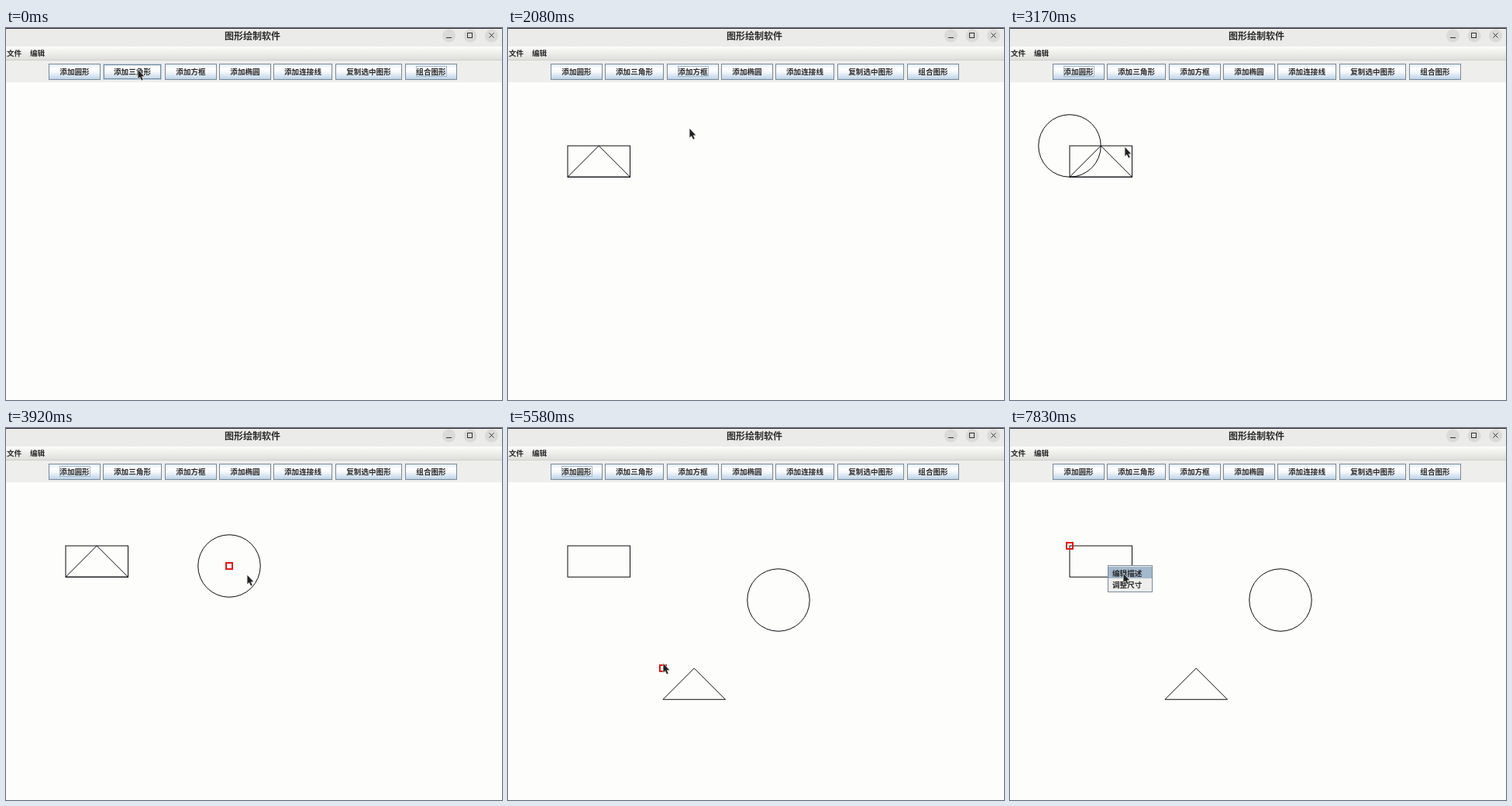
An HTML page with a canvas that plays this animation: 640 by 480 pixels, repeating every 8000 ms.

```html
<!DOCTYPE html>
<html lang="zh-CN">
<head>
<meta charset="utf-8">
<title>图形绘制软件</title>
<style>
  html, body { margin: 0; width: 640px; height: 480px; overflow: hidden; background: #fdfdfb; }
  canvas { display: block; }
</style>
</head>
<body>
<canvas id="stage" width="640" height="480"></canvas>
<script>
const ctx = document.getElementById('stage').getContext('2d');
const LOOP = 8000, STEP = 1000 / 12;
const FONT = '"Noto Sans CJK SC", "Noto Sans CJK", "Noto Sans", sans-serif';
const INK = '#0c0c10', PANEL = '#eeeeec', EDGE = '#7a8a99', PALE = '#b8cfe5';
const CHAR = 9.6, HOME = [77, 152], W = 80.5, H = W / 2;

// Moments at which the user does something, in ms
const AT = {
  triangle: 250, box: 1667, circle: 2917,
  grabCircle: 3333, dropCircle: 4083,
  grabTriangle: 4583, dropTriangle: 5333,
  deselect: 6083, pickBox: 7000, popup: 7333
};

// Pointer moves from where it rests: start, end, x, y
const moves = [
  [AT.triangle, 750, 192, 164],
  [917, 1417, 235, 56],
  [AT.box, 2083, 234, 130],
  [2167, 2500, 300, 56],
  [2500, 2833, 92, 55],
  [AT.circle, 3167, 148, 154],
  [3167, AT.grabCircle, 100, 164],
  [AT.grabCircle, 3917, 311, 190],
  [3917, AT.dropCircle, 372, 234],
  [4250, AT.grabTriangle, 86, 159],
  [AT.grabTriangle, 4917, 172, 228],
  [4917, AT.dropTriangle, 209, 317],
  [5417, 5583, 200, 304],
  [6167, 6667, 126, 177],
  [7417, 7667, 146, 188]
];

function pointer(t) {
  let x = 170, y = 54;
  for (const [start, end, toX, toY] of moves) {
    const k = Math.max(0, Math.min(1, (t - start) / (end - start)));
    x += (toX - x) * k;
    y += (toY - y) * k;
  }
  return [Math.round(x), Math.round(y)];
}

// Every shape starts at HOME and follows the pointer while held
function dragged(t, grab, drop) {
  const from = pointer(grab), to = pointer(Math.max(grab, Math.min(t, drop)));
  return HOME.map((v, i) => v + to[i] - from[i]);
}

// Buttons sit in a row, each as wide as its text
let nextX = 55;
const buttons = ['圆形', '三角形', '方框', '椭圆', '连接线']
  .map(name => '添加' + name)
  .concat('复制选中图形', '组合图形')
  .map(text => {
    const w = 28.4 + CHAR * text.length, x = Math.round(nextX);
    nextX += w + 3.4;
    return { text, x, w: Math.round(w) };
  });

function fill(color, x, y, w, h) {
  ctx.fillStyle = color;
  ctx.fillRect(x, y, w, h);
}

function frame(color, x, y, w, h) {
  ctx.strokeStyle = color;
  ctx.lineWidth = 1;
  ctx.strokeRect(x + 0.5, y + 0.5, w - 1, h - 1);
}

function gradient(y0, y1, ...stops) {
  const g = ctx.createLinearGradient(0, y0, 0, y1);
  stops.forEach(([at, color]) => g.addColorStop(at, color));
  return g;
}

function label(text, x, y, size = CHAR, align = 'left') {
  ctx.font = `700 ${size}px ${FONT}`;
  ctx.textAlign = align;
  ctx.textBaseline = 'alphabetic';
  ctx.fillStyle = '#2a2a2a';
  ctx.fillText(text, x, y + size * 0.37);
}

function line(points, color = INK, close = false) {
  ctx.beginPath();
  points.forEach(([x, y]) => ctx.lineTo(x, y));
  if (close) ctx.closePath();
  ctx.strokeStyle = color;
  ctx.lineWidth = 1;
  ctx.stroke();
}

function drawTitle() {
  const ink = '#333333';
  fill('#ebebe9', 0, 0, 640, 24);
  fill('#252525', 0, 0, 640, 1);
  label('图形绘制软件', 318, 11, 12, 'center');
  for (const x of [571.5, 599, 626.5]) {
    ctx.beginPath();
    ctx.arc(x, 10, 8.5, 0, Math.PI * 2);
    ctx.fillStyle = '#dadad8';
    ctx.fill();
  }
  line([[568, 12.5], [575, 12.5]], ink);
  frame(ink, 595, 6, 7, 7);
  line([[623.5, 6.5], [629.5, 12.5]], ink);
  line([[629.5, 6.5], [623.5, 12.5]], ink);
}

function drawBars() {
  fill(gradient(24, 41, [0, '#fdfdfb'], [1, '#dededb']), 0, 24, 640, 17);
  fill('#d0d0ce', 0, 41, 640, 1);
  fill(PANEL, 0, 42, 640, 28);
  label('文件', 1, 32.5);
  label('编辑', 31, 32.5);
}

function drawButton({ text, x, w }, focused, hover) {
  const y = 46, h = 21;
  fill(gradient(y, y + h, [0, '#dde8f3'], [0.3, '#ffffff'], [0.5, '#f6f9fb'], [1, PALE]), x, y, w, h);
  frame(hover ? PALE : EDGE, x, y, w, h);
  if (hover) frame(EDGE, x + 1, y + 1, w - 2, h - 2);
  if (focused) {
    const tw = Math.round(text.length * CHAR + 2);
    frame('#a3b8cc', Math.round(x + (w - tw) / 2), 49, tw, 14);
  }
  label(text, x + w / 2, 56.5, CHAR, 'center');
}

function drawBox([x, y]) {
  ctx.strokeStyle = INK;
  ctx.lineWidth = 1;
  ctx.strokeRect(x, y, W, H);
}

function drawCircle([x, y]) {
  ctx.beginPath();
  ctx.arc(x, y, H, 0, Math.PI * 2);
  ctx.strokeStyle = INK;
  ctx.lineWidth = 1;
  ctx.stroke();
}

function drawTriangle([x, y]) {
  line([[x + W / 2, y], [x + W, y + H], [x, y + H]], INK, true);
}

function drawHandle([x, y]) {
  ctx.strokeStyle = '#e01818';
  ctx.lineWidth = 2;
  ctx.strokeRect(x - 4, y - 4, 8, 8);
}

function drawPopup(lit) {
  fill(PANEL, 126, 177, 58, 35);
  frame(EDGE, 126, 177, 58, 35);
  if (lit) fill('#a3b8cc', 127, 179, 56, 15);
  label('编辑描述', 132, 187);
  label('调整尺寸', 132, 202.5);
}

function drawPointer([x, y]) {
  ctx.save();
  ctx.translate(x, y);
  ctx.scale(0.9, 0.9);
  ctx.beginPath();
  [[0.5, 0], [0.5, 12.5], [3.2, 10], [5.6, 15], [7.4, 14], [5.2, 9.4], [9, 9.2]]
    .forEach(([px, py]) => ctx.lineTo(px, py));
  ctx.closePath();
  ctx.strokeStyle = '#e4e4e4';
  ctx.lineWidth = 1.6;
  ctx.lineJoin = 'round';
  ctx.stroke();
  ctx.fillStyle = '#222222';
  ctx.fill();
  ctx.restore();
}

function focusAt(t) {
  if (t >= AT.popup) return -1;
  if (t >= AT.circle) return 0;
  if (t >= AT.box) return 2;
  return t >= AT.triangle ? 1 : 6;
}

function draw(t) {
  const mouse = pointer(t), [mx, my] = mouse;
  const circle = dragged(t, AT.grabCircle, AT.dropCircle);
  const triangle = dragged(t, AT.grabTriangle, AT.dropTriangle);
  const focus = focusAt(t);

  fill('#fdfdfb', 0, 0, 640, 480);
  drawTitle();
  drawBars();
  buttons.forEach((b, i) => {
    const over = mx >= b.x && mx < b.x + b.w && my >= 46 && my < 67;
    drawButton(b, i === focus, over);
  });

  if (t >= AT.triangle) drawTriangle(triangle);
  if (t >= AT.box) drawBox(HOME);
  if (t >= AT.circle) drawCircle(circle);

  if (t >= AT.pickBox) drawHandle(HOME);
  else if (t >= AT.grabTriangle && t < AT.deselect) drawHandle(triangle);
  else if (t >= AT.grabCircle && t < AT.grabTriangle) drawHandle(circle);

  if (t >= AT.popup) drawPopup(my >= 179);
  drawPointer(mouse);
}

// The picture advances twelve times a second
function tick(now) {
  const t = now % LOOP;
  draw(Math.ceil(Math.floor((t + 4) / STEP) * STEP) % LOOP);
  requestAnimationFrame(tick);
}
draw(0);
requestAnimationFrame(tick);
</script>
</body>
</html>
```
